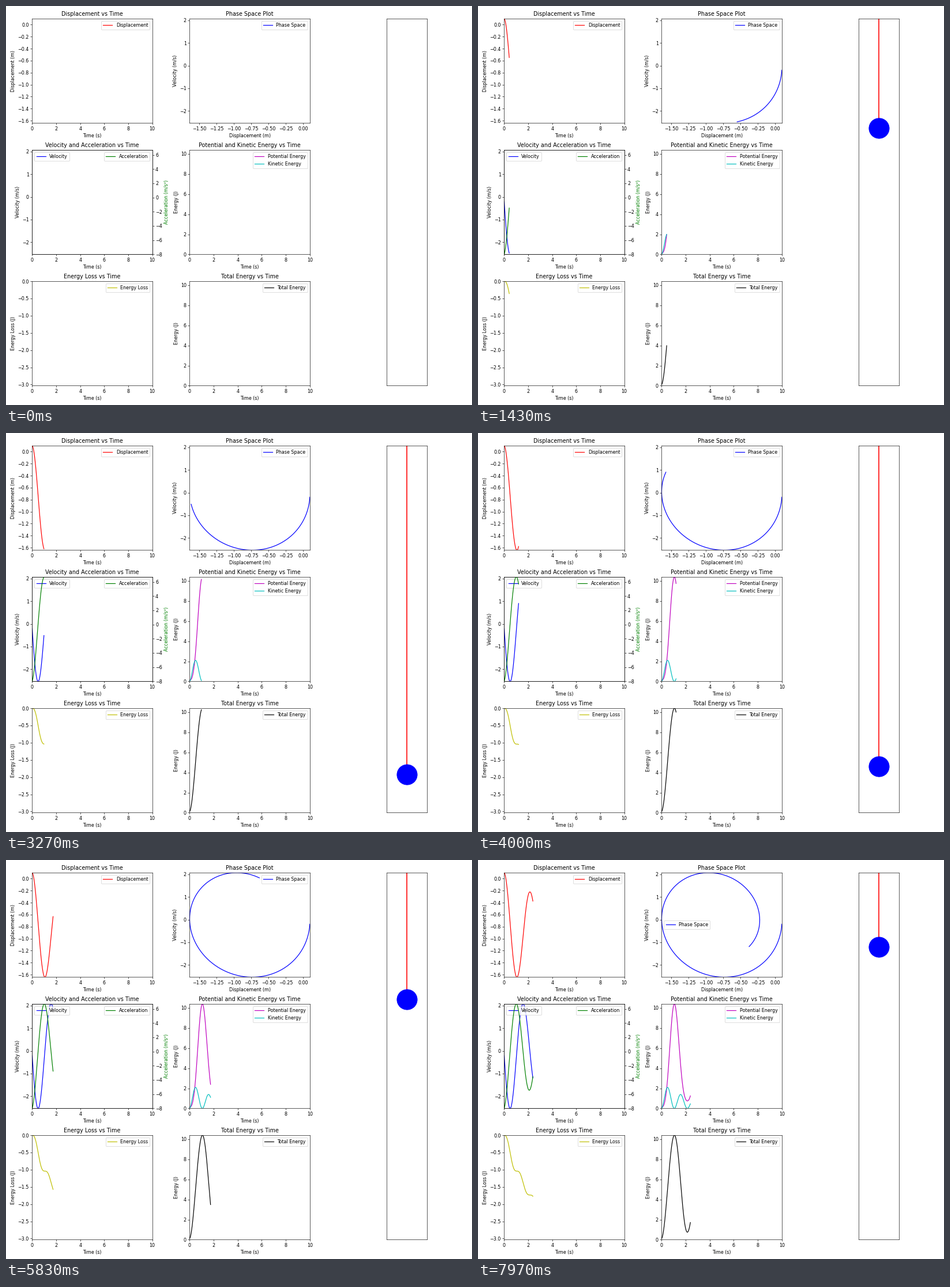
Recreate the animation shown at these times as a matplotlib script. Size 808x693 px, loop 8000 ms.

```python
import numpy as np
import matplotlib.pyplot as plt
from matplotlib.animation import FuncAnimation

W, H = 808, 693
DPI = W / 14
FRAMES, LOOP_MS = 240, 8000

# Damped mass on a hanging spring, integrated with explicit Euler steps
MASS, STIFF, DAMP, GRAV, REST = 0.65, 5.5, 0.3, 9.81, 0.3
DT, STEPS = 0.01, 1000


def simulate():
    rows = []
    x, v, loss = 0.1, -0.2, 0.0
    for _ in range(STEPS):
        a = -GRAV - (STIFF * (x - REST) + DAMP * v) / MASS
        rows.append((x, v, a, loss))
        loss -= DAMP * v * v * DT
        x, v = x + v * DT, v + a * DT
    return np.array(rows).T


time = np.arange(STEPS) * DT
disp, vel, acc, loss = simulate()
pot = 0.5 * STIFF * (disp - REST) ** 2
kin = 0.5 * MASS * vel ** 2
total = pot + kin

plt.rcParams["font.family"] = "DejaVu Sans"
fig = plt.figure(figsize=((W + 1e-6) / DPI, (H + 1e-6) / DPI), dpi=DPI,
                 facecolor="white")

COLS = [(45.4, 253.5), (318.4, 526.8)]
ROWS = [(22, 203.5), (250, 431.5), (478, 659.5)]
curves = []


def add_axes(xs, ys):
    (x0, x1), (y0, y1) = xs, ys
    return fig.add_axes([x0 / W, 1 - y1 / H, (x1 - x0) / W, (y1 - y0) / H])


def span(data):
    return data.min(), data.max()


def panel(col, row, title, ylabel, ylim, xlabel="Time (s)", xlim=(0, 10)):
    ax = add_axes(COLS[col], ROWS[row])
    ax.set_title(title, y=1.0)
    ax.set(xlabel=xlabel, ylabel=ylabel, xlim=xlim, ylim=ylim)
    return ax


def curve(ax, xs, ys, color, label):
    line, = ax.plot([], [], color=color, label=label)
    curves.append((line, xs, ys))


ax_disp = panel(0, 0, "Displacement vs Time", "Displacement (m)", span(disp))
curve(ax_disp, time, disp, "r", "Displacement")

ax_phase = panel(1, 0, "Phase Space Plot", "Velocity (m/s)", span(vel),
                 "Displacement (m)", span(disp))
curve(ax_phase, disp, vel, "b", "Phase Space")

ax_vel = panel(0, 1, "Velocity and Acceleration vs Time", "Velocity (m/s)",
               span(vel))
curve(ax_vel, time, vel, "b", "Velocity")
ax_acc = ax_vel.twinx()
ax_acc.set_ylim(span(acc))
ax_acc.set_ylabel("Acceleration (m/s²)", color="g")
ax_acc.set_title("", y=1.0)
curve(ax_acc, time, acc, "g", "Acceleration")

ax_en = panel(1, 1, "Potential and Kinetic Energy vs Time", "Energy (J)",
              (0, pot.max()))
curve(ax_en, time, pot, "m", "Potential Energy")
curve(ax_en, time, kin, "c", "Kinetic Energy")

ax_loss = panel(0, 2, "Energy Loss vs Time", "Energy Loss (J)",
                (loss.min(), 0))
curve(ax_loss, time, loss, "y", "Energy Loss")

ax_total = panel(1, 2, "Total Energy vs Time", "Energy (J)",
                 (0, total.max()))
curve(ax_total, time, total, "k", "Total Energy")

for ax in (ax_disp, ax_acc, ax_en, ax_loss, ax_total):
    ax.legend(loc="upper right")
ax_vel.legend(loc="upper left")
ax_phase.legend(loc="best")

# Hanging ball
ax_ball = add_axes((660.2, 730.4), (22, 659.5))
ax_ball.set(xlim=(-0.1, 0.1), ylim=(-1.808, -0.0121), xticks=[], yticks=[])
spring, = ax_ball.plot([], [], "r", lw=2)
ball, = ax_ball.plot([], [], "bo", ms=36 * 72 / DPI - 1)


def freeze_labels():
    """Fix the automatic label positions so later draws are cheaper."""
    fig.canvas.draw()
    for ax in fig.axes:
        inv = ax.transAxes.inverted()
        lx = inv.transform((ax.yaxis.label.get_position()[0], 0))[0]
        ly = inv.transform((0, ax.xaxis.label.get_position()[1]))[1]
        ax.yaxis.set_label_coords(lx, 0.5)
        ax.xaxis.set_label_coords(0.5, ly)


def update(i):
    for line, xs, ys in curves:
        line.set_data(xs[:i + 1], ys[:i + 1])
    spring.set_data([0, 0], [REST, disp[i]])
    ball.set_data([0], [disp[i]])
    return [line for line, _, _ in curves] + [spring, ball]


freeze_labels()
anim = FuncAnimation(fig, update, frames=FRAMES, init_func=lambda: update(0),
                     interval=LOOP_MS / FRAMES, repeat=True, repeat_delay=0,
                     blit=False)
plt.show()
```
